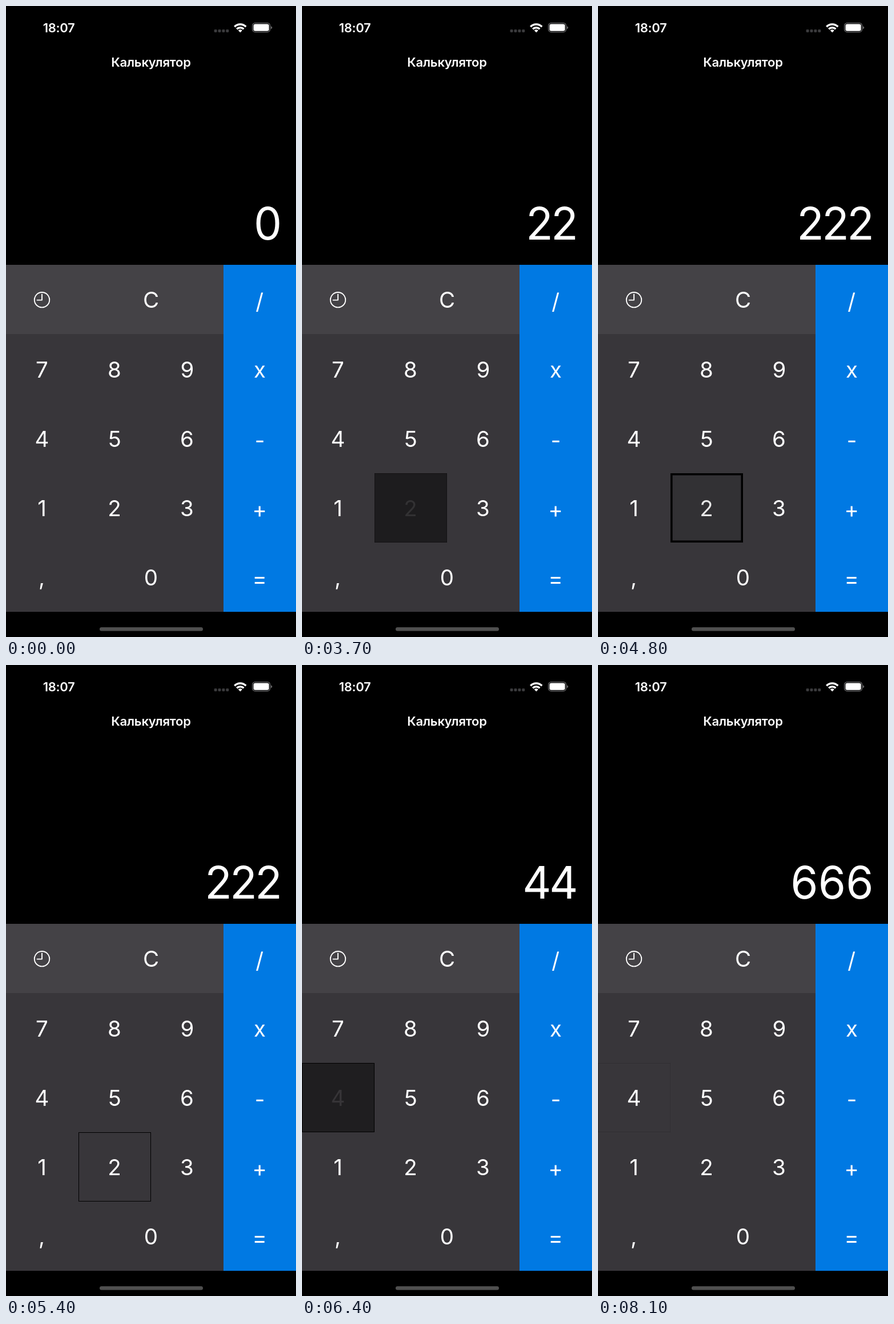
Write an HTML page that moves like this. It is 508 px wide and 1102 px high and loops after 8200 ms.

```html
<!DOCTYPE html>
<html lang="ru">
<head>
<meta charset="utf-8">
<title>Калькулятор</title>
<style>
  html, body { margin: 0; width: 100%; height: 100%; overflow: hidden; background: #000; }
  svg { display: block; width: 508px; height: 1102px; }
  text { font-family: Inter, "Open Sans", sans-serif; fill: #fff; text-anchor: middle; }
  .bar { font-size: 22px; font-weight: 600; }
  .key { font-size: 38.5px; }
  .display { font-size: 78px; }
</style>
</head>
<body>
<svg id="stage" viewBox="0 0 508 1102">
  <rect width="508" height="1102"/>
  <text class="bar" x="92.5" y="45.5" letter-spacing="-.3">18:07</text>
  <text class="bar" x="254" y="105.5" letter-spacing="-.2">Калькулятор</text>

  <g fill="#3b3b3d">
    <rect x="364.6" y="41" width="5" height="5" rx="1.4"/>
    <rect x="371.5" y="41" width="5" height="5" rx="1.4"/>
    <rect x="378.4" y="41" width="5" height="5" rx="1.4"/>
    <rect x="385.3" y="41" width="5" height="5" rx="1.4"/>
  </g>
  <g fill="none" stroke="#fff" stroke-width="3.4">
    <path d="M400.3 36.2A14 14 0 0 1 420.3 36.2"/>
    <path d="M404.2 40.2A8.7 8.7 0 0 1 416.4 40.2"/>
  </g>
  <path d="M406.8 42.7A5 5 0 0 1 413.8 42.7L410.3 46.2Z" fill="#fff"/>
  <rect x="431.6" y="29.6" width="31" height="16" rx="5" fill="none" stroke="#69696b" stroke-width="1.3"/>
  <rect x="433.5" y="31.5" width="27.2" height="12.2" rx="3.3" fill="#fff"/>
  <path d="M464.2 35.2Q466.2 36 466.2 37.7T464.2 40.2Z" fill="#78787a"/>

  <text id="display" class="display" y="408"></text>

  <rect y="452" width="381" height="121" fill="#444246"/>
  <rect y="573" width="381" height="485" fill="#38363a"/>
  <rect x="381" y="452" width="127" height="606" fill="#0079e3"/>
  <g fill="none" stroke="#fff" stroke-width="1.9">
    <circle cx="63" cy="513.2" r="13.2"/>
    <path d="M63 503.5V513.6H54.5" stroke-linecap="round" stroke-linejoin="round"/>
  </g>
  <g id="keys"></g>
  <rect x="164" y="1085" width="181" height="6.6" rx="3.3" fill="#4f4f4f"/>
</svg>
<script>
const LOOP = 8200, STEP = 100;
const NS = 'http://www.w3.org/2000/svg';
const $ = id => document.getElementById(id);

function add(parent, tag, attrs) {
  const el = document.createElementNS(NS, tag);
  for (const k in attrs) el.setAttribute(k, attrs[k]);
  return parent.appendChild(el);
}

// label, centre x, baseline
const LABELS = [
  ['C', 254, 527], ['7', 63, 649], ['8', 190, 649], ['9', 317.5, 649],
  ['4', 63, 770], ['5', 190.5, 770], ['6', 317, 770],
  ['1', 63, 891], ['2', 190, 891], ['3', 317, 891],
  [',', 62.5, 1012], ['0', 254, 1012],
  ['/', 444.3, 530], ['x', 444.5, 649], ['-', 444.5, 772], ['+', 444.3, 893], ['=', 444.3, 1014]
];

// keys whose face reacts to a tap: x, y, width, height
const FACES = { 2: [127, 816, 127, 121], 4: [0, 695, 127, 121] };

// key, touch down, touch up, resulting display
const TAPS = [
  ['2', 3300, 3390, '2'], ['2', 3600, 3690, '22'], ['2', 3950, 4050, '222'],
  ['+', 4900, 5010, '222'],
  ['4', 6100, 6170, '4'], ['4', 6300, 6370, '44'], ['4', 6510, 6600, '444'],
  ['=', 7700, 7790, '666']
];

// time since touch up -> value
const ALPHA = [[0, .5], [30, .56], [150, .715], [600, .87], [1100, 1]];
const BORDER = [[0, 0], [30, 1], [150, 3.6], [380, 4.9], [600, 4.4], [950, 2.4], [1350, 1], [1520, 0]];
const FADE = [[30, .2], [230, 1]];

// digit spacing and last-digit centre on the display
const PITCH = { 0: [44, 458.5], 2: [44, 460], 4: [47, 458.5], 6: [48.5, 458.5] };

function sample(table, t) {
  if (t <= table[0][0]) return table[0][1];
  for (let i = 1; i < table.length; i++) {
    const [t0, v0] = table[i - 1], [t1, v1] = table[i];
    if (t < t1) return v0 + (v1 - v0) * (t - t0) / (t1 - t0);
  }
  return table[table.length - 1][1];
}

const keys = {};
for (const [label, x, y] of LABELS) {
  const key = keys[label] = {}, box = FACES[label];
  let parent = $('keys');
  if (box) {
    const [bx, by, width, height] = box;
    key.box = box;
    key.back = add(parent, 'rect', { x: bx, y: by, width, height });
    key.group = parent = add(parent, 'g', {});
    key.face = add(parent, 'rect', { fill: '#38363a' });
  }
  key.text = add(parent, 'text', { class: 'key', x, y });
  key.text.textContent = label;
}

function drawKey(label, t) {
  const key = keys[label];
  let light = 1, alpha = 1, border = 0;
  for (const [name, down, up] of TAPS) {
    if (name !== label || t < down) continue;
    light = t < up ? .2 : sample(FADE, t - up);
    if (t >= up) {
      alpha = sample(ALPHA, t - up);
      border = sample(BORDER, t - up);
    }
  }
  key.text.setAttribute('opacity', light);
  if (!key.box) return;
  const [x, y, w, h] = key.box;
  key.back.setAttribute('visibility', border > 0 || alpha < 1 ? 'visible' : 'hidden');
  key.group.setAttribute('opacity', alpha);
  const face = { x: x + border, y: y + border, width: w - 2 * border, height: h - 2 * border };
  for (const k in face) key.face.setAttribute(k, face[k]);
}

function drawDisplay(t) {
  let value = '0';
  for (const [, , up, result] of TAPS) if (t >= up) value = result;
  const [pitch, last] = PITCH[value[0]];
  const xs = [...value].map((_, i) => last - pitch * (value.length - 1 - i));
  $('display').setAttribute('x', xs.join(' '));
  $('display').textContent = value;
}

function frame(now) {
  const t = Math.floor(now % LOOP / STEP) * STEP;
  for (const label of ['2', '4', '+', '=']) drawKey(label, t);
  drawDisplay(t);
  requestAnimationFrame(frame);
}
frame(0);
</script>
</body>
</html>
```
